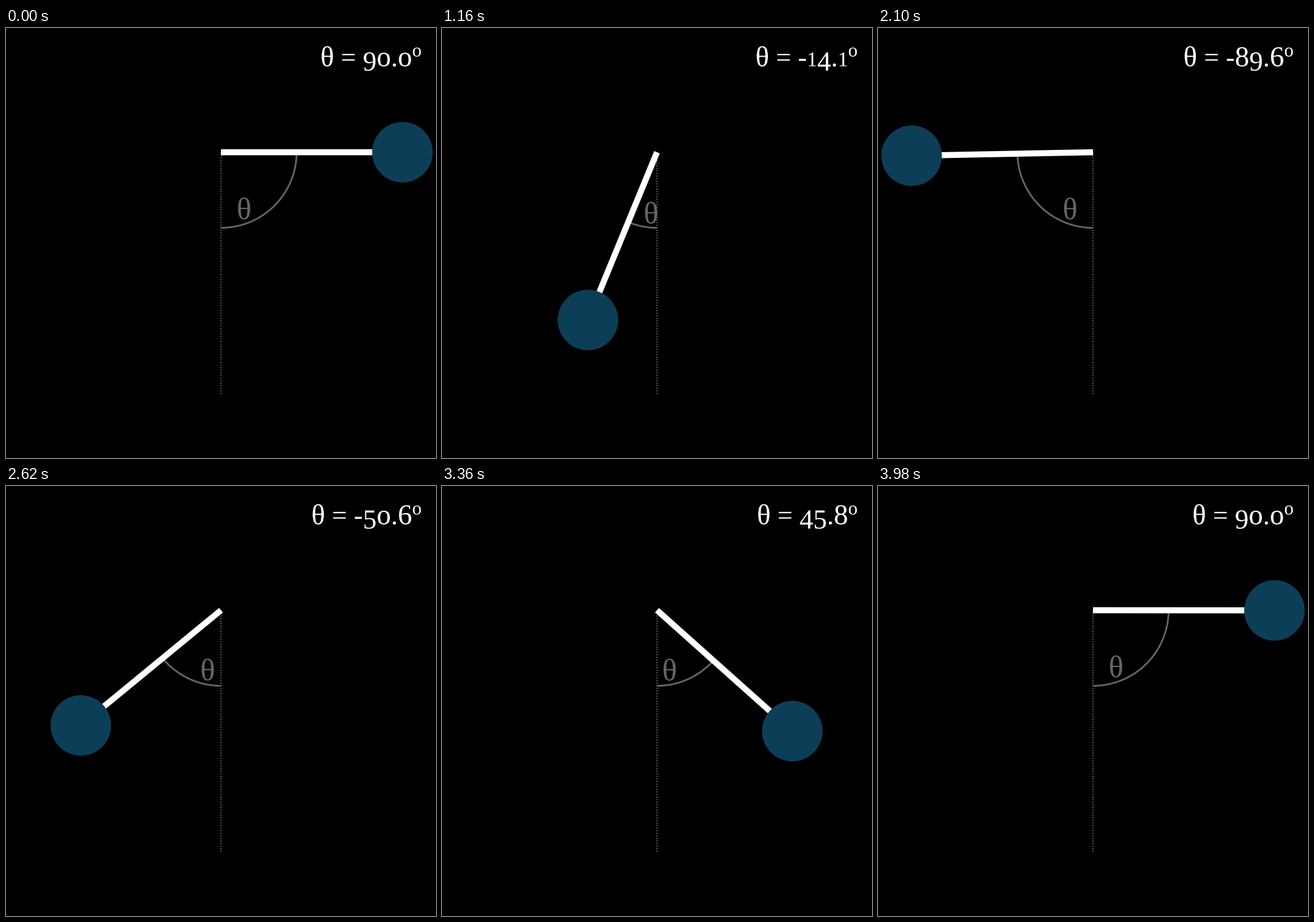
Write a matplotlib script that moves like this. It is 748 by 748 pixels and loops after 4 s.

```python
import numpy as np
import matplotlib.pyplot as plt
from matplotlib.animation import FuncAnimation
from matplotlib.patches import Circle, PathPatch
from matplotlib.path import Path
from matplotlib.textpath import TextPath
from matplotlib.transforms import Affine2D

SIZE, DPI = 748, 64
FRAMES, INTERVAL = 200, 20
PT = 72 / DPI                      # points per pixel
UNIT = 52.6                        # bob radius; all lengths are multiples of it
PIVOT = np.array([374.0, 216.1])
SWING = 90
READOUT_STEP = 4                   # the readout refreshes every 4th frame
RIGHT, BASELINE = 723, 66.5
GREY, BLUE = "#666666", "#0c3f57"
FONT = {"family": "Liberation Serif"}

fig = plt.figure(figsize=(SIZE / DPI, SIZE / DPI), dpi=DPI, facecolor="black")
ax = fig.add_axes([0, 0, 1, 1])
ax.set(xlim=(0, SIZE), ylim=(SIZE, 0))
ax.axis("off")


def style(char):
    """Old-style figures: glyph, size and rise above the baseline."""
    if char == "0":
        return "o", 50, 0
    if char in "12":
        return char, 36, 0
    if char in "34579":
        return char, 48, -7.5
    if char in "68θ":
        return char, 50, 0
    if char == "º":
        return "o", 33, 17
    return char, 47, 0


def right_edge(text, size):
    return TextPath((0, 0), text, size=size, prop=FONT).get_extents().x1


def make_glyph(char):
    """Outline (y down) and advance width of one character."""
    name, size, rise = style(char)
    advance = right_edge(name + "|", size) - right_edge("|", size)
    if char == " ":
        return None, advance
    path = TextPath((0, 0), name, size=size, prop=FONT)
    return Affine2D().translate(0, rise).scale(1, -1).transform_path(path), advance


glyphs = {c: make_glyph(c) for c in "0123456789.-=θº "}


def right_aligned(text):
    x, parts = RIGHT, []
    for char in reversed(text):
        path, advance = glyphs[char]
        x -= advance
        if path is not None:
            parts.append(Affine2D().translate(x, BASELINE).transform_path(path))
    return Path.make_compound_path(*parts)


def centred_theta(size):
    path = TextPath((0, 0), "θ", size=size, prop=FONT)
    box = path.get_extents()
    mid = (box.x0 + box.x1) / 2, (box.y0 + box.y1) / 2
    return Affine2D().translate(-mid[0], -mid[1]).scale(1, -1).transform_path(path)


def polar(angle, radius):
    """Point at an angle from the downward vertical, in degrees."""
    a = np.radians(angle)
    return PIVOT[0] + radius * UNIT * np.sin(a), PIVOT[1] + radius * UNIT * np.cos(a)


def stroke(color, width, z, **kw):
    return ax.plot([], [], color=color, lw=width * PT, zorder=z,
                   solid_capstyle="butt", snap=False, **kw)[0]


def filled(path, color, z):
    patch = PathPatch(path, fc=color, ec="none", lw=0, zorder=z)
    ax.add_patch(patch)
    return patch


plumb = stroke(GREY, 2, 1, linestyle=(0, (1, 1.25)), dash_capstyle="butt")
plumb.set_data([PIVOT[0]] * 2, [PIVOT[1], PIVOT[1] + 8 * UNIT])
arc = stroke(GREY, 3, 2)
rod = stroke("white", 10.5, 4)
bob = Circle(PIVOT, UNIT, fc=BLUE, ec="none", lw=0, zorder=5)
ax.add_patch(bob)
theta_shape = centred_theta(54)
theta = filled(theta_shape, GREY, 3)
readout = filled(right_aligned("θ = 0.0º"), "white", 6)


def angle_at(frame):
    return SWING * np.cos(2 * np.pi * frame / FRAMES)


def update(frame):
    angle = angle_at(frame)
    arc.set_data(*polar(np.linspace(0, angle, 80), 2.5))
    rod.set_data(*polar(angle, np.array([0, 5.2])))
    bob.center = polar(angle, 6)
    x, y = polar(angle / 4, 2)
    theta.set_path(Affine2D().translate(x, y + 0.6).transform_path(theta_shape))
    shown = angle_at(frame - (frame + 1) % READOUT_STEP)
    readout.set_path(right_aligned(f"θ = {shown:.1f}º"))
    return arc, rod, bob, theta, readout


anim = FuncAnimation(fig, update, frames=FRAMES, interval=INTERVAL,
                     repeat=True, repeat_delay=0, blit=False)
plt.show()
```
